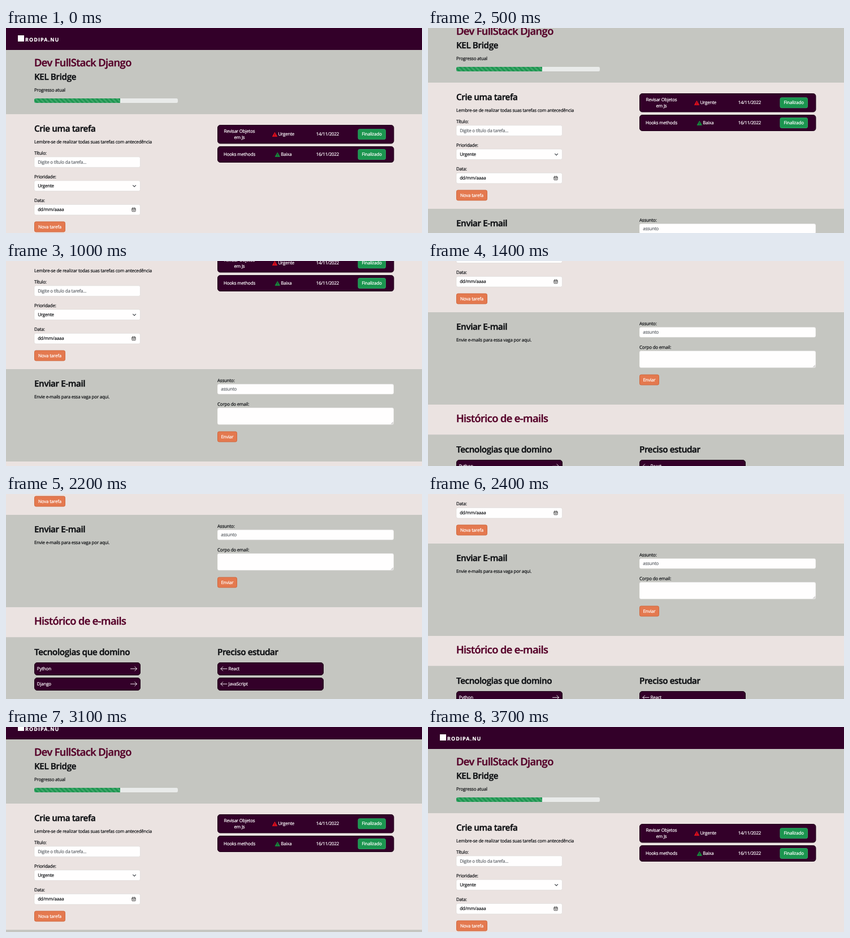
Animation, 736 px wide and 364 px high, one loop 4100 ms. Source, as an HTML page:

```html
<!DOCTYPE html>
<html lang="pt-BR">
<head>
<meta charset="utf-8">
<title>Tarefas</title>
<style>
  html, body { margin: 0; width: 100%; height: 100%; overflow: hidden; background: #c5c6c1; }
  svg { display: block; width: 736px; height: 364px; }
  text {
    font: 8px "Open Sans", "Noto Sans", sans-serif;
    letter-spacing: -.027em;
    color: #0d0f12;
    fill: currentColor;
    stroke: currentColor;
    stroke-width: .2px;
    text-rendering: geometricPrecision;
    white-space: pre;
  }
  .h1, .h2 { font-weight: 600; stroke-width: .4px; }
  .h1 { font-size: 18.3px; letter-spacing: -.033em; color: #560029; }
  .h2 { font-size: 15.3px; letter-spacing: -.028em; }
  .brand { font-size: 9px; font-weight: 700; letter-spacing: 1.07px; }
  .light { color: #fff; }
  .hint { color: #62676c; }
  .mid { text-anchor: middle; }
  .field { fill: #fffefe; stroke: #d3d0ce; stroke-width: .5; }
  .line { fill: none; stroke-linecap: round; stroke-linejoin: round; }
</style>
</head>
<body>
<svg viewBox="0 0 736 364" xmlns="http://www.w3.org/2000/svg">
  <defs>
    <pattern id="stripes" width="5.657" height="5.657" patternUnits="userSpaceOnUse" patternTransform="translate(50 133) rotate(-45)">
      <rect width="2.83" height="5.657" fill="#fff" fill-opacity=".15"/>
    </pattern>
    <clipPath id="track"><rect x="50" y="125" width="254" height="8" rx="2.5"/></clipPath>
  </defs>
  <g id="page"></g>
</svg>
<script>
const NS = "http://www.w3.org/2000/svg";
const page = document.getElementById("page");
const PLUM = "#330029", PLUM_EDGE = "#1c0016";
const GREEN = "#1b954f", GREEN_EDGE = "#2aa562";
const ORANGE = "#e4794f", ORANGE_EDGE = "#d0683f";
const GRAY = "#c5c6c1", PALE = "#ebe3e1";

function add(tag, attrs, content) {
  const el = document.createElementNS(NS, tag);
  for (const key in attrs) el.setAttribute(key, attrs[key]);
  if (content) el.textContent = content;
  return page.appendChild(el);
}
const box = (x, y, width, height, fill, rx = 0, more = {}) =>
  add("rect", { x, y, width, height, fill, rx, ...more });
const framed = (x, y, w, h, fill, edge, rx) =>
  box(x + .5, y + .5, w - 1, h - 1, fill, rx, { stroke: edge });
const text = (x, y, str, cls = "") => add("text", { x, y, class: cls }, str);
const line = (d, stroke, width = 1) =>
  add("path", { d, stroke, "stroke-width": width, class: "line" });
const field = (x, y, w, h) =>
  add("rect", { x, y, width: w, height: h, rx: 3, class: "field" });

function button(x, y, w, h, label, fill, edge) {
  framed(x, y, w, h, fill, edge, 2.5);
  text(x + w / 2, y + h / 2 + 2.6, label, "mid light");
}

function warning(x, y, color) {
  add("path", {
    d: `M${x} ${y - 3.7}L${x + 4.1} ${y + 3.5}H${x - 4.1}Z`,
    fill: color, stroke: color, "stroke-linejoin": "round"
  });
  line(`M${x} ${y - 1.2}v2M${x} ${y + 2.3}v.1`, PLUM, .7);
}

function task(y, h, lines, level, levelX, color, date) {
  const mid = y + h / 2;
  framed(374, y, 312.5, h, PLUM, PLUM_EDGE, 4.5);
  lines.forEach((str, i) =>
    text(413, mid + 2.6 + (i - (lines.length - 1) / 2) * 11.6, str, "mid light"));
  warning(levelX - 6, mid + .4, color);
  text(levelX, mid + 2.6, level, "light");
  text(569, mid + 2.6, date, "mid light");
  button(622.5, mid - 9.5, 49.5, 19, "Finalizado", GREEN, GREEN_EDGE);
}

function skill(x, y, name, known) {
  framed(x, y, 188, 23, PLUM, PLUM_EDGE, 4.5);
  const mid = y + 11.3;
  text(x + (known ? 4.8 : 19.5), mid + 2.3, name, "light");
  const tail = known ? x + 170.5 : x + 17, dir = known ? 1 : -1;
  line(`M${tail} ${mid}h${11 * dir}m${-3.6 * dir} -3.6l${3.6 * dir} 3.6l${-3.6 * dir} 3.6`, "#fff", .9);
}

// Section backgrounds
box(0, 0, 736, 39, PLUM);
box(0, 39, 736, 114, GRAY);
box(0, 153, 736, 224, PALE);
box(0, 377, 736, 164, GRAY);
box(0, 541, 736, 53.5, PALE);
box(0, 594.5, 736, 120, GRAY);

// Header and progress
box(21, 13, 11, 11, "#fff");
text(34, 23.6, "RODIPA.NU", "brand light");
text(50, 67.8, "Dev FullStack Django", "h1");
text(50, 92.2, "KEL Bridge", "h2");
text(50, 113.4, "Progresso atual");
box(50, 125, 254, 8, "#e9ebea", 2.5);
for (const fill of [GREEN, "url(#stripes)"])
  box(50, 125, 152, 8, fill, 0, { "clip-path": "url(#track)" });

// New task form
text(50, 183.8, "Crie uma tarefa", "h2");
text(50, 205.3, "Lembre-se de realizar todas suas tarefas com antecedência");
text(50, 225, "Título:");
field(50, 228.8, 187.5, 18.6);
text(56.2, 240.5, "Digite o título da tarefa...", "hint");
text(50, 267, "Prioridade:");
field(50, 271, 187.5, 18.6);
text(56.2, 282.8, "Urgente");
line("M224.6 279.3l2.5 2.5l2.5 -2.5", "#343a40", 1.1);
text(50, 309.4, "Data:");
field(50, 313.4, 187.5, 18.6);
text(56.2, 325, "dd/mm/aaaa");
box(222.9, 319.9, 6.2, 5.9, "none", .8, { stroke: "#222", "stroke-width": .8 });
line("M223 321.7h6M224.4 319v1M227.6 319v1M224.6 323.7h2.8", "#222", .8);
button(50, 343.5, 55, 19, "Nova tarefa", ORANGE, ORANGE_EDGE);

// Task list
task(172, 33.5, ["Revisar Objetos", "em Js"], "Urgente", 481.5, "#e00f1c", "14/11/2022");
task(210, 29, ["Hooks methods"], "Baixa", 486.3, "#158a3c", "16/11/2022");

// E-mail form
text(50, 408.4, "Enviar E-mail", "h2");
text(50, 429.2, "Envie e-mails para essa vaga por aqui.");
text(374, 399.7, "Assunto:");
field(374, 403.6, 312, 18);
text(380.2, 414.8, "assunto", "hint");
text(374, 442, "Corpo do email:");
field(374, 445.6, 312, 30);
line("M681.5 474.3l3.3 -3.3M683.4 474.4l1.5 -1.5", "#777", .6);
button(374, 487.5, 35, 19, "Enviar", ORANGE, ORANGE_EDGE);

// History and skills
text(50, 571.8, "Histórico de e-mails", "h1");
text(50, 625.8, "Tecnologias que domino", "h2");
text(374, 625.8, "Preciso estudar", "h2");
skill(50, 639, "Python", true);
skill(50, 666, "Django", true);
skill(374, 639, "React", false);
skill(374, 666, "JavaScript", false);

// Scroll keys: time in ms, offset in px, speed in px per ms
const LOOP = 4100, STEP = 100;
const KEYS = [
  [0, 0, .03], [500, 56, .2], [1000, 185, .28], [1400, 286, .22],
  [1800, 340, 0], [2200, 340, 0], [2700, 139, -.42], [3300, 0, 0], [LOOP, 0, 0]
];

function scrollAt(t) {
  const i = KEYS.findIndex(key => key[0] > t);
  const [t0, y0, v0] = KEYS[i - 1], [t1, y1, v1] = KEYS[i];
  const span = t1 - t0, u = (t - t0) / span, w = 1 - u;
  return y0 * w * w * (1 + 2 * u) + y1 * u * u * (3 - 2 * u)
    + span * u * w * (v0 * w - v1 * u);
}

function draw(ms) {
  const t = Math.floor((ms % LOOP) / STEP) * STEP;
  page.setAttribute("transform", `translate(0 ${-Math.round(scrollAt(t))})`);
}

const start = performance.now();
function tick() {
  draw(performance.now() - start);
  requestAnimationFrame(tick);
}
tick();
</script>
</body>
</html>
```
